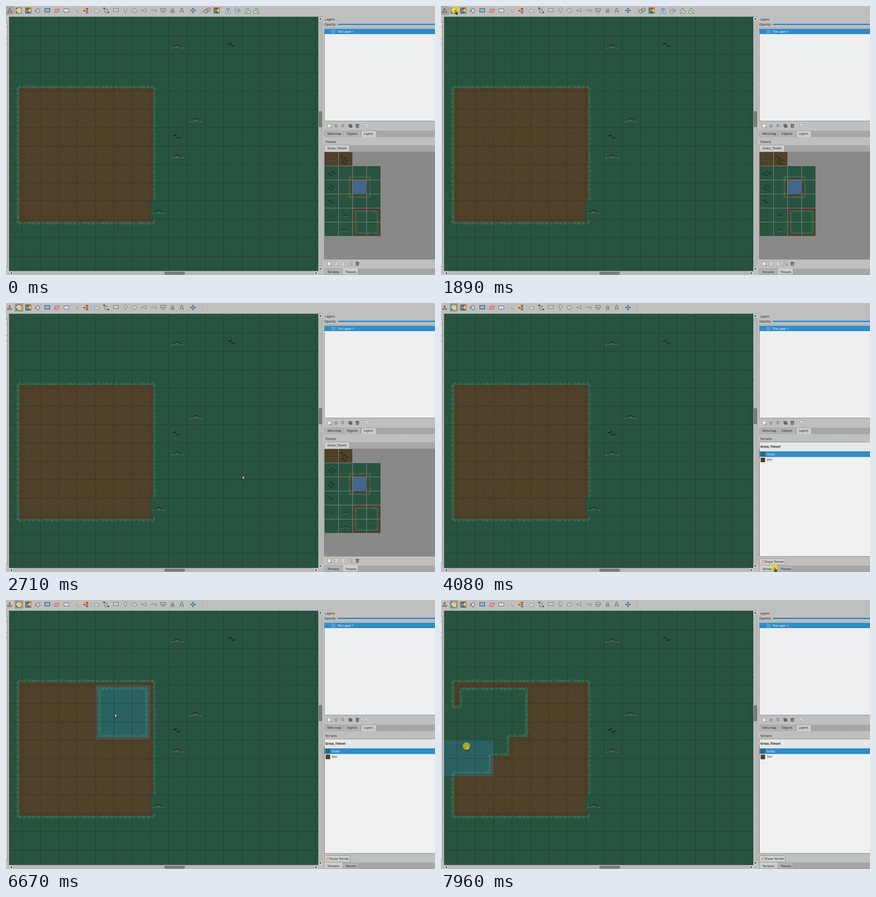
Write an HTML page with a canvas that moves like this. It is 945x593 px and loops after 7990 ms.

```html
<!DOCTYPE html>
<html lang="en">
<head>
<meta charset="utf-8">
<title>Terrain brush</title>
<style>
html, body { margin: 0; width: 100%; height: 100%; overflow: hidden; background: #bfbfbf; }
canvas, svg { position: absolute; left: 0; top: 0; width: 945px; height: 593px; display: block; }
text { font: 6.9px "Noto Sans", "Open Sans", sans-serif; fill: #1c1c1c; }
.b { font-weight: 700; }
.w { fill: #fff; }
</style>
</head>
<body>
<canvas id="map" width="945" height="593"></canvas>
<svg viewBox="0 0 945 593">
  <path fill="#bfbfbf" fill-rule="evenodd" d="M0 0H945V593H0zM7 24V584H688V24zM701 322V558H945V322z"/>
  <path d="M7 23.5H697M6.500 23V584M701 321.500H945M701 558.500H945M700.500 322V558" stroke="#929292" fill="none"/>
  <path d="M0 36H2V574H0z" fill="#ededed"/>
  <path d="M0 36H3M2.500 36V574M0 574H3M0 46H2M0 72H2M0 83H2" stroke="#777" fill="none"/>

  <!-- scroll bars -->
  <path d="M688 24H697V584H688zM7 585H688V593H7z" fill="#b9b9b9"/>
  <path d="M696.500 24V584M688 584.500H7" stroke="#a4a4a4"/>
  <path d="M688 24H697V32H688zM688 576H697V584H688zM7 585H16V593H7zM679 585H688V593H679z" fill="#cbcbcb"/>
  <path d="M690 29.500L692.500 26.500 695 29.500zM690 578.500L692.500 581.500 695 578.500zM13 586.500L10 589 13 591.500zM682 586.500L685 589 682 591.500z" fill="#222"/>
  <rect x="689.500" y="232.500" width="6" height="34" rx="1" fill="#7c7c7c" stroke="#686868"/>
  <rect x="349.500" y="586.500" width="44" height="5" rx="1" fill="#7c7c7c" stroke="#686868"/>

  <!-- layers -->
  <text x="703" y="32.300">Layers</text>
  <text x="701" y="43">Opacity:</text>
  <rect x="731" y="39" width="216" height="3" rx="1" fill="#308cc6"/>
  <rect x="701.500" y="48.500" width="250" height="205" fill="#eeeff0" stroke="#8d8d8d"/>
  <rect x="702" y="50" width="243" height="12" fill="#308cc6"/>
  <path d="M717.500 53.500H725M717.500 56.500H725M717.500 59.500H725" stroke="#b5d5ea" stroke-width="1.300" stroke-dasharray="1.500 1.400"/>
  <text class="w" x="730" y="58.600">Tile Layer 1</text>
  <g id="layerTools"></g>
  <rect x="701" y="275" width="244" height="14" fill="#a6a6a6"/>
  <path d="M701.500 288.500V275.500H781.500V288.500M742.500 276V288" fill="#b3b3b3" stroke="#9c9c9c"/>
  <path d="M782.500 289V275H815.500V289" fill="#cdcdcd" stroke="#989898"/>
  <text x="708" y="284.200">Mini-map</text>
  <text x="750" y="284.200">Objects</text>
  <text x="788" y="284.200">Layers</text>
  <path d="M873 291.500H882" stroke="#d4d4d4" stroke-dasharray="1 1.500"/>

  <!-- tilesets -->
  <g id="tilesets">
    <text x="703" y="302.400">Tilesets</text>
    <rect x="701" y="307" width="244" height="14" fill="#a6a6a6"/>
    <path d="M701.500 321V306.500H756.500V321" fill="#cdcdcd" stroke="#989898"/>
    <text x="708" y="316.400">Grass_Tileset</text>
    <g id="setTools"></g>
  </g>

  <!-- terrains -->
  <g id="terrains">
    <text x="703" y="302.400">Terrains</text>
    <rect x="701.500" y="306.500" width="250" height="252" fill="#eff0f0" stroke="#8d8d8d"/>
    <rect x="702" y="307" width="243" height="20" fill="#e6e7e7"/>
    <text class="b" x="703.500" y="319.300">Grass_Tileset</text>
    <rect x="702" y="327" width="243" height="12.500" fill="#308cc6"/>
    <rect x="704" y="328" width="10" height="10" fill="#2c6674"/>
    <text class="w" x="717.500" y="335.800">Grass</text>
    <rect x="704" y="341" width="10" height="10" fill="#51412a"/>
    <text x="717.500" y="348.400">Dirt</text>
    <rect x="701.500" y="563.500" width="57" height="14" rx="1.500" fill="#d2d2d2" stroke="#8f8f8f"/>
    <path d="M705 573L708 567.500H714L711 573z" fill="#e6b49c" stroke="#b58068" stroke-width=".7"/>
    <text x="714" y="573.400">Erase Terrain</text>
  </g>
  <rect x="701" y="579" width="244" height="14" fill="#a6a6a6"/>
  <rect x="701.500" y="579.500" width="74" height="13" fill="#b3b3b3" stroke="#9c9c9c"/>
  <path id="tab" fill="#cdcdcd" stroke="#989898"/>
  <text x="708" y="588.600">Terrains</text>
  <text x="747.500" y="588.600">Tilesets</text>

  <!-- tool bar -->
  <rect id="pressed" y="1" height="18" rx="2" fill="#a9a9a9" stroke="#959595"/>
  <g id="tools"></g>
  <g id="stampTools"></g>

  <path id="cursor" d="M0 0V9.800L2.300 7.700 4 11.300 5.400 10.700 3.800 7.200H6.600z" stroke="#000" stroke-width=".8"/>
  <circle id="press" r="8" fill="#efdf10" opacity=".6"/>
</svg>
<script>
const $ = id => document.getElementById(id);
const g = $('map').getContext('2d');
const LOOP = 7990, STEP = 40.4, X0 = 35, Y0 = 187;
const GRASS = '#28533f', TINT = 'rgba(48,140,198,.25)';
const BRUSH_AT = 2020, PANEL_AT = 4080, PAINT_AT = 7610;
const colX = i => Math.round(X0 + STEP * i);
const rowY = j => Math.round(Y0 + STEP * j);
const rnd = (x, y) => { const s = Math.sin(x * 12.9898 + y * 78.233) * 43758.5453; return s - Math.floor(s); };

/* ---- icons ---- */
const line = (d, c = '#707070', f = 'none') => `<path d="${d}" stroke="${c}" fill="${f}"/>`;
const box = (x, y, w, h, f, s = 'none') => `<rect x="${x}" y="${y}" width="${w}" height="${h}" fill="${f}" stroke="${s}"/>`;
const place = (id, y, list) => {
  $(id).innerHTML = list.map(([x, m]) => `<g transform="translate(${x} ${y})">${m}</g>`).join('');
};
const rainbow = line('M-6 -6H6L0 0z', 'none', '#e23a2a') + line('M6 -6V6L0 0z', 'none', '#ecd82c') +
  line('M-6 6H6L0 0z', 'none', '#3458cc') + line('M-6 -6V6L0 0z', 'none', '#38a84a') + box(-6, -6, 12, 12, 'none', '#555');
const flip = line('M-1.500 -6V6H-6zM1.500 -6V6H6z', '#4a7d9c', '#dfeaf0');
const spin = line('M-6 6H6L6 -1z', '#47764a', '#d9e6d2') + line('M-5 1Q-4 -5 2 -4M0 -7L3 -4 0 -2', '#4b8a3c');

place('tools', 10, [
  [8, line('M-4.500 4.500V2H-2Q0 0 -1.500 -2.500 -1.500 -5 0 -5 1.500 -5 1.500 -2.500 0 0 2 2H4.500V4.500z', '#5b4630', '#c8a67c')],
  [28, box(-6, -6, 12, 12, '#e9d98a', '#555') + line('M-6 6V0L0 6z', 'none', '#4c9a55') + line('M-6 -6H0L-6 -1z', 'none', '#5b8fc4') + line('M-3 3L5 -5', '#b58a1c')],
  [49, rainbow + line('M-3 4L5 -4', '#f2ead0')],
  [70, line('M-4 -2L1 -5 5 2 0 6z', '#444', '#d8d8d8') + line('M-4 -1Q-7 0 -5 4', '#555')],
  [91, box(-5.500, -4.500, 11, 8, '#8fb6cf', '#2c4252')],
  [112, line('M-6 4L-3 -3H6L3 4z', '#a8605a', '#e89a92')],
  [133, box(-5.500, -3.500, 11, 7, '#dcdcdc', '#666')],
  [155, line('M-1 -1L5 5', '#8a6a3a') + line('M-3 -6V0M-6 -3H0', '#e2c85a')],
  [176, box(-6, -5, 5, 3, '#e6b830') + box(-6, -1, 5, 3, '#d8452f') + box(0, -6, 5, 4, '#d8452f') + box(0, -1, 5, 3, '#4a9a4a') + box(0, 3, 5, 3, '#4a68b8')],
  [188, line('M0 -6V6', '#aaa')],
  [200, line('M-5 -3H0L2 -1H5V4H-5z', '#888', '#d2d2d2')],
  [221, line('M-5 -5L-3 5 5 4M-5 -5L3 -2 0 1', '#666') + box(-6.500, -6.500, 3, 3, '#444') + box(3, 2.500, 3, 3, '#444')],
  [242, box(-5.500, -4.500, 11, 7, '#cacaca', '#707070')],
  [263, line('M0 5L-3 -1Q-4 -6 0 -6 4 -6 3 -1z', '#707070', '#cacaca')],
  [283, '<ellipse rx="5.500" ry="4" fill="#cacaca" stroke="#707070"/>'],
  [304, line('M-6 0L4 -4 5 3z', '#707070', '#cacaca')],
  [325, line('M-6 1L-2 -3 1 2 5 -3 6 4')],
  [346, box(-5.500, -4.500, 11, 5, '#bbb', '#707070') + line('M-3 1V4H3V1')],
  [367, box(-3.500, -.5, 7, 5, '#999', '#808080') + line('M-2 -1V-4Q0 -7 2 -4V-1')],
  [387, line('M-4 5L-1 -5H1L4 5M-2.500 2H2.500', '#555')],
  [412, line('M-5 0H5M0 -5V5', '#2b6fa0') + line('M-6.500 0L-3 -2.500V2.500zM6.500 0L3 -2.500V2.500zM0 -6.500L-2.500 -3H2.500zM0 6.500L-2.500 3H2.500z', 'none', '#2b6fa0')],
  [432, line('M0 -6V6', '#aaa')]
]);
const die = line('M0 -4L4 -2V2L0 4 -4 2V-2z', '#444', '#d6d6d6') + line('M-4 -2L0 0 4 -2M0 0V4', '#777');
place('stampTools', 10, [
  [443, `<g transform="translate(3 -2)">${die}</g><g transform="translate(-3 2)">${die}</g>`],
  [464, rainbow],
  [489, flip],
  [511, `<g transform="rotate(90)">${flip}</g>`],
  [532, spin],
  [552, `<g transform="scale(-1 1)">${spin}</g>`]
]);
const page = box(-3.500, -4, 7, 8, '#efefe4', '#a5a08a') + line('M1 -3H4M2.500 -5V-1', '#e0c040');
const bin = line('M-3 -2L-2.500 4H2.500L3 -2z', '#444', '#a0a0a0') + line('M-4 -3H4', '#333') + line('M0 -1V3', '#555');
const arrow = line('M0 -4L4 0H2V4H-2V0H-4z', '#979797', '#9f9f9f');
place('layerTools', 264, [
  [712, page + line('M3 4H5', '#222')], [727, arrow], [742, `<g transform="scale(1 -1)">${arrow}</g>`],
  [758.5, box(-3.500, -3.500, 5, 5, '#9db2c0', '#555') + box(-1.500, -1.500, 5, 5, '#5b7488', '#444')],
  [774, bin], [795, box(-4, -4, 5, 4, '#eee', '#aaa') + box(-1, 0, 5, 4, '#ddd', '#aaa')]
]);
place('setTools', 568, [
  [712, page + line('M3 4H5', '#222')], [727, box(-3, -4, 6, 8, '#eee', '#999') + line('M-3 0H1', '#777')],
  [743, box(-3, -4, 6, 8, '#dcdcdc', '#b0b0b0') + line('M0 0H4', '#999')],
  [759, box(-4, -4, 7, 8, '#ddd', '#999') + line('M0 0L4 4', '#555') + '<circle r="2" fill="#eee" stroke="#777"/>'],
  [774, bin]
]);

/* ---- terrain tiles; mask bits are the dirt corners: 1 tl, 2 tr, 4 br, 8 bl ---- */
function dirtDistance(mask, x, y) {
  const w = 3.6, a = -9, z = 41, e = 32 - w;
  const parts = [
    [1, a, a, w, w], [2, e, a, z, w], [4, e, e, z, z], [8, a, e, w, z],
    [3, a, a, z, w], [6, e, a, z, z], [12, a, e, z, z], [9, a, a, w, z], [15, a, a, z, z]
  ];
  let best = 99;
  for (const [m, x0, y0, x1, y1] of parts) {
    if ((mask & m) !== m) continue;
    const dx = Math.max(x0 - x, x - x1), dy = Math.max(y0 - y, y - y1);
    best = Math.min(best, dx < 0 && dy < 0 ? Math.max(dx, dy) : Math.hypot(Math.max(dx, 0), Math.max(dy, 0)));
  }
  return best;
}
function dirtColor(x, y) {
  const sum = (x & 3) + (y & 3), hit = rnd(x >> 2, (y >> 2) + 9) > .68;
  if (hit && sum === 3 && (x & 3) < 3) return '#625036';
  if (hit && sum === 4) return '#443722';
  return rnd(x, y) > .7 ? '#4d3e28' : '#524229';
}
// Blades lean along x + y and grow in clumps of eight pixels.
function tileColor(mask, x, y) {
  const d = dirtDistance(mask, x + .5, y + .5), lean = (x + y) % 32, clump = lean % 8;
  const blade = 3 + 4.5 * Math.sin(Math.PI * (clump + .5) / 8) * (.6 + .4 * rnd(lean, 3));
  if (d < -1.8) return dirtColor(x, y);
  if (d < .4) return rnd(x, y) < .45 ? '#613a26' : rnd(y, x) < .5 ? '#3d3423' : '#524229';
  if (d > blade) return GRASS;
  if (d < 1.8) return ['#5a3f28', '#31553d', '#39432e'][lean % 3];
  if (rnd(x, y) < .15) return '#23483a';
  return lean % 2 ? '#2f624a' : d < 5.5 ? '#417b5e' : '#376d53';
}
const tiles = Array.from({ length: 16 }, (_, mask) => {
  const c = document.createElement('canvas');
  c.width = c.height = 32;
  const q = c.getContext('2d');
  for (let n = 0; n < 1024; n++) {
    q.fillStyle = tileColor(mask, n % 32, n >> 5);
    q.fillRect(n % 32, n >> 5, 1, 1);
  }
  return c;
});

/* ---- plants ---- */
function tuft(x, y, s = 1) {
  const p = 1.26 * s;
  const bar = (c, from, to, color) => {
    g.fillStyle = color;
    g.fillRect(x + (c - .5) * p, y + from * p, p, (to - from) * p);
  };
  for (let c = -10; c <= 10; c++) {
    const a = Math.abs(c), top = -5 + a * .7 + (c % 4 ? 0 : 1.5), foot = 5 - (a > 8 ? 1 : 0);
    if (c % 2) bar(c, top + .5, foot, '#0f2018');
    else {
      bar(c, top, top + 1.2, '#4d7a61');
      bar(c, Math.max(top + 2.5, 0), a > 6 ? 3 : 4.5, '#86a891');
    }
  }
}
function twig(x, y, s = 1) {
  g.save();
  g.translate(x, y);
  g.scale(s, s);
  g.lineWidth = 2;
  g.strokeStyle = '#0f2118';
  g.stroke(new Path2D('M-8 -2.500L-5 -1 -3 -2M-4 -4L0 -3M0 1L2 3.500 5 4M4 1.500L8 2.500'));
  g.lineWidth = 1;
  g.strokeStyle = '#5d7d68';
  g.stroke(new Path2D('M-7 -4H-5M3 2.500H5'));
  g.restore();
}

/* ---- pointer: time, x, y at each turn ---- */
const keys = [
  [240, 893, 579], [1030, 100, 48], [1060, 96, 45], [1560, 31, 8], [2180, 31, 8], [2710, 520, 379],
  [2950, 681, 515], [2980, 684, 518], [3360, 731, 581], [3750, 731, 581], [3850, 734, 582],
  [4420, 734, 582], [5160, 753, 334], [5230, 753, 334], [5440, 730, 333], [6050, 730, 333],
  [6670, 239.500, 249.500], [6820, 226, 247], [7300, 150, 244], [7610, 132, 243],
  [7700, 100, 250], [7780, 88, 275], [7850, 62, 295], [7940, 56, 322], [7990, 56, 322]
];
const eased = new Set([1560, 3360, 5160, 5440]);
function pointer(t) {
  const k = Math.max(1, keys.findIndex(p => p[0] > t));
  const [t0, x0, y0] = keys[k - 1], [t1, x1, y1] = keys[k];
  let u = Math.max(0, (t - t0) / (t1 - t0));
  if (eased.has(t1)) u = u * u * (3 - 2 * u);
  else if (t1 === 6670) u = 1 - (1 - u) ** 1.7;
  return [x0 + (x1 - x0) * u, y0 + (y1 - y0) * u];
}
const clicks = [[1890, 2020], [4080, 4210], [5620, 5760], [PAINT_AT, LOOP]];
const onMap = ([x, y]) => x >= 7 && x < 688 && y >= 24 && y < 584;
const cellAt = ([x, y]) => [Math.floor((x - X0) / STEP), Math.floor((y - Y0) / STEP)];

function clearCorners(set, [i, j]) {
  for (const a of [0, 1]) for (const b of [0, 1]) set.add(`${i + a},${j + b}`);
}
function paintedCorners(t, cell) {
  const set = new Set();
  for (let s = PAINT_AT; s <= t; s += 5) {
    const c = cellAt(pointer(s));
    if (`${c}` !== `${cell}`) clearCorners(set, c);
  }
  return set;
}
function maskAt(i, j, cleared) {
  const dirt = (a, b) => a >= 0 && a < 8 && b >= 0 && b < 8 && !cleared.has(`${a},${b}`);
  return dirt(i, j) + 2 * dirt(i + 1, j) + 4 * dirt(i + 1, j + 1) + 8 * dirt(i, j + 1);
}

function fillCell(i, j, paint) {
  const x = colX(i), y = rowY(j), w = colX(i + 1) - x, h = rowY(j + 1) - y;
  if (paint.width) return g.drawImage(paint, x, y, w, h);
  g.fillStyle = paint;
  g.fillRect(x, y, w, h);
}

function drawMap(t, pos) {
  const hover = t >= 240 && onMap(pos), cell = cellAt(pos);
  const done = paintedCorners(t, cell), next = new Set(done);
  if (hover && t >= BRUSH_AT) clearCorners(next, cell);

  g.save();
  g.beginPath();
  g.rect(7, 24, 681, 560);
  g.clip();
  g.fillStyle = GRASS;
  g.fillRect(7, 24, 681, 560);
  for (let j = -1; j < 8; j++) for (let i = -1; i < 8; i++) {
    const mask = maskAt(i, j, next);
    if (i === 7 && j === 6) continue;
    if (mask) fillCell(i, j, tiles[mask]);
    if (mask !== maskAt(i, j, done)) fillCell(i, j, TINT);
  }
  if (t > 2420) {
    g.strokeStyle = 'rgba(52,108,140,.5)';
    g.lineWidth = 1.3;
    for (let x = 158; x < 194; x += 4) {
      const r = rnd(x, 1) * 4;
      g.beginPath();
      g.moveTo(x, 182 - r / 2);
      g.lineTo(x + 3, 179 - r);
      g.stroke();
    }
  }
  [[377, 88], [417.500, 250], [377, 330.500], [336.500, 452.500]].forEach(p => tuft(...p));
  twig(497, 85.500);
  twig(376, 287.500);
  g.fillStyle = '#10231a';
  g.fillRect(686, 169.500, 2, 2);
  if (hover && t < BRUSH_AT) {
    fillCell(...cell, tiles[15]);
    fillCell(...cell, TINT);
  }
  g.strokeStyle = 'rgba(10,24,17,.45)';
  g.lineWidth = 1;
  g.setLineDash([2, 1]);
  g.beginPath();
  for (let i = 0; i < 17; i++) { g.moveTo(colX(i) + .5, 24); g.lineTo(colX(i) + .5, 584); }
  for (let j = -3; j < 10; j++) { g.moveTo(7, rowY(j) + .5); g.lineTo(688, rowY(j) + .5); }
  g.stroke();
  g.restore();
}

const setMasks = [[15, 15], [0, 4, 12, 8], [0, 6, 15, 9], [0, 2, 3, 1], [0, 0, 11, 7], [0, 0, 13, 14]];
function drawTileset() {
  g.fillStyle = '#888988';
  g.fillRect(701, 322, 244, 236);
  setMasks.forEach((row, r) => row.forEach((mask, c) => {
    g.drawImage(tiles[mask], 702 + 31 * c, 322 + 31 * r, 30, 30);
  }));
  g.fillStyle = '#41678a';
  g.fillRect(764, 384, 31, 31);
  tuft(715, 339, .5);
  tuft(747, 462.500, .65);
  tuft(747, 494, .75);
  [[742, 333], [748, 338], [745, 345], [713, 371], [721, 367], [718, 397], [714, 403], [715, 430]]
    .forEach(([x, y]) => twig(x, y, .72));
  twig(718, 462.500, .4);
}

const show = (id, on) => $(id).setAttribute('display', on ? 'inline' : 'none');
function render(t) {
  const pos = pointer(t), brush = t >= BRUSH_AT, panel = t >= PANEL_AT;
  drawMap(t, pos);
  if (!panel) drawTileset();
  show('tilesets', !panel);
  show('terrains', panel);
  show('stampTools', !brush);
  $('pressed').setAttribute('x', brush ? 19.5 : -1);
  $('pressed').setAttribute('width', brush ? 18 : 19);
  $('tab').setAttribute('d', panel ? 'M701.5 578V592.5H741.5V578' : 'M741.5 578V592.5H775.5V578');

  const at = `translate(${pos[0].toFixed(1)} ${pos[1].toFixed(1)})`;
  show('cursor', t >= 240);
  $('cursor').setAttribute('transform', at);
  $('cursor').setAttribute('fill', onMap(pos) ? '#dcc0bf' : '#111');
  show('press', clicks.some(([a, b]) => t >= a && t < b));
  $('press').setAttribute('transform', at);
}

const start = performance.now();
function tick() {
  render((performance.now() - start) % LOOP);
  requestAnimationFrame(tick);
}
tick();
</script>
</body>
</html>
```
